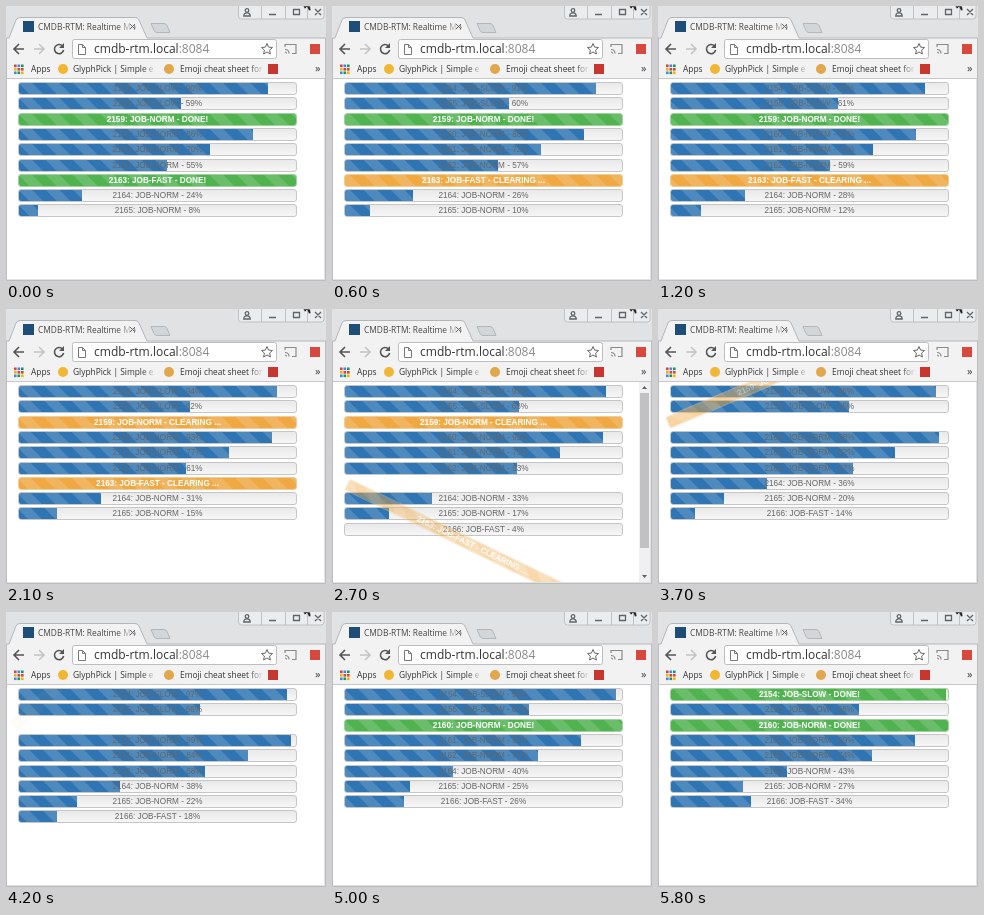
Animation of 320x275 px, one loop 5.9 s. Source, as an HTML page:

```html
<!DOCTYPE html>
<html lang="en">
<head>
<meta charset="utf-8">
<title>Job monitor</title>
<style>
html, body { margin: 0; width: 100%; height: 100%; overflow: hidden; background: #fff; }
#stage { position: relative; width: 320px; height: 275px; overflow: hidden; }
svg { position: absolute; left: 0; top: 0; font: 8.4px "Open Sans", "Noto Sans", sans-serif; }
#page { position: absolute; left: 1px; top: 73px; width: 317px; height: 200px; overflow: hidden; }
.job {
  position: absolute; left: 11px; width: 279px; height: 13px; box-sizing: border-box;
  border: 1px solid #c6c6c6; border-radius: 3px; overflow: hidden;
  background: linear-gradient(#e9e9e9, #f6f6f6); transform-origin: 0 100%;
  font: 8.2px/12px "Liberation Sans", Arial, sans-serif; text-align: center; color: #666;
}
.fill {
  position: absolute; left: 0; top: 0; height: 100%;
  background: linear-gradient(45deg, #ffffff26 25%, #0000 25% 50%, #ffffff26 50% 75%, #0000 75%) 0 0 / 27.3px 27.3px #2f75b3;
}
.label { position: absolute; left: 0; width: 100%; }
.done, .clear { color: #fff; font-weight: bold; }
.done { border-color: #9fd09f; }
.clear { border-color: #efcd9a; }
.done .fill { background-color: #50b350; }
.clear .fill { background-color: #f0a843; }
#scroll { position: absolute; right: 0; top: 0; width: 11px; height: 200px; background: #f0f0f0; }
#thumb { position: absolute; left: 1px; top: 11px; width: 9px; background: #c1c1c1; }
#scroll svg { fill: #606060; }
</style>
</head>
<body>
<div id="stage">
<svg width="320" height="275">
  <defs>
    <linearGradient id="fade"><stop offset="0" stop-color="#f2f2f2" stop-opacity="0"/><stop offset="1" stop-color="#f2f2f2"/></linearGradient>
  </defs>
  <rect width="320" height="275" fill="#e0e2e4"/>
  <!-- window buttons -->
  <path d="M232.500 0V10q0 3 3 3H315q3 0 3-3V0M255.500 0V13M279.500 0V13M301.500 0V13" fill="#ebecee" stroke="#bfc2c5"/>
  <g fill="none" stroke="#606468" stroke-width="1.300">
    <circle cx="241" cy="4.500" r="1.800"/><path d="M237.800 10q0-3.200 3.200-3.200t3.200 3.200z"/>
    <path d="M263 8.500h7M287.500 3.500h6v5h-6zM309 3l6 6m0-6l-6 6"/>
  </g>
  <path d="M297 0h7l1 4-2 1-2-4-2 2z" fill="#222" stroke="#fff" stroke-width=".5"/>
  <!-- tab strip -->
  <path d="M0 32H3L10 14Q11 11.500 14 11.500H129Q132 11.500 133 14L141 32H320V73H0Z" fill="#f2f2f2"/>
  <path d="M0 32H3L10 14Q11 11.500 14 11.500H129Q132 11.500 133 14L141 32H320" fill="none" stroke="#b4b7ba"/>
  <path d="M145 17.500h13q2 0 3 2l3 7h-13q-2 0-3-2z" fill="#d3d6d9" stroke="#b4b7ba"/>
  <rect x="17" y="15" width="11" height="11" fill="#1e4e78"/>
  <text x="32" y="24" fill="#444">CMDB-RTM: Realtime Mo</text>
  <rect x="111" y="14" width="17" height="14" fill="url(#fade)"/>
  <path d="M124 18l5 5m0-5l-5 5" stroke="#666"/>
  <!-- toolbar -->
  <g fill="none" stroke-width="1.600">
    <path d="M18 43H8m5-5l-5 5 5 5" stroke="#555"/>
    <path d="M28 43h10m-5-5l5 5-5 5" stroke="#c4c4c4"/>
    <path d="M56.500 40A4.600 4.600 0 1 0 57.600 44" stroke="#555"/>
  </g>
  <path d="M58 37v5h-5z" fill="#555"/>
  <rect x="66.500" y="33.500" width="204" height="19" rx="2" fill="#fff" stroke="#bdbdbd"/>
  <path d="M72.500 38.500h4l3 3v7h-7zM76.500 38.500v3h3" fill="none" stroke="#777"/>
  <text x="88" y="47" font-size="12" fill="#333">cmdb-rtm.local<tspan fill="#888">:8084</tspan></text>
  <path d="M261 37.500l1.600 3.600 3.900.4-2.900 2.600.8 3.900-3.400-2-3.400 2 .8-3.900-2.900-2.600 3.900-.4z" fill="none" stroke="#666"/>
  <g fill="none" stroke="#8b8b8b" stroke-width="1.200">
    <path d="M279 41v-2.500h11v9h-4M279 43.500q4 0 4 4M279 46q1.500 0 1.500 1.500"/>
  </g>
  <rect x="304" y="38" width="10" height="10" fill="#d9483f"/>
  <!-- bookmarks -->
  <g id="apps"></g>
  <g fill="#333">
    <text x="25" y="66">Apps</text>
    <text x="67" y="66">GlyphPick | Simple e</text>
    <text x="174" y="66">Emoji cheat sheet for</text>
    <text x="309" y="66" font-size="11">»</text>
  </g>
  <rect x="136" y="57" width="14" height="13" fill="url(#fade)"/>
  <rect x="243" y="57" width="15" height="13" fill="url(#fade)"/>
  <circle cx="57" cy="63" r="5" fill="#f3b632"/>
  <circle cx="163" cy="63" r="5" fill="#e2a64c"/>
  <rect x="262" y="58" width="10" height="10" fill="#c8372f"/>
  <path d="M0 72.500H320" stroke="#c8c8c8"/>
  <rect x="1" y="73" width="317" height="200" fill="#fff"/>
  <path d="M.5 32V274.500H319.500V32" fill="none" stroke="#b9bdc1"/>
</svg>
<div id="page">
  <div id="scroll">
    <div id="thumb"></div>
    <svg width="11" height="200"><path d="M3 7h5L5.500 4zM3 193h5l-2.500 3z"/></svg>
  </div>
</div>
</div>
<script>
const LOOP = 5.9, WIDTH = 279, PITCH = 15.3;
const RATE = { SLOW: 1.62, NORM: 3.3, FAST: 9.6 };
const LAG = { SLOW: 0.6, NORM: 1.2, FAST: 4.8 };
const $ = id => document.getElementById(id);

// from: percent at time 0; the other times are in seconds
const jobs = [
  { id: 2154, type: "SLOW", from: 90.4, done: 5.6 },
  { id: 2155, type: "SLOW", from: 59 },
  { id: 2159, type: "NORM", from: 100, done: -1, clear: 1.4, out: 3.4, turn: -45 },
  { id: 2160, type: "NORM", from: 85.6, done: 4.4 },
  { id: 2161, type: "NORM", from: 70 },
  { id: 2162, type: "NORM", from: 54.55 },
  { id: 2163, type: "FAST", from: 100, done: -1, clear: 0.4, out: 2.35, turn: 45 },
  { id: 2164, type: "NORM", from: 23.8 },
  { id: 2165, type: "NORM", from: 8.1 },
  { id: 2166, type: "FAST", from: -21.98, start: 2.3 },
];

for (const job of jobs) {
  job.el = document.createElement("div");
  job.el.innerHTML = '<div class="fill"></div><div class="label"></div>';
  [job.fill, job.label] = job.el.children;
  $("page").insertBefore(job.el, $("scroll"));
}

const colors = ["#db4437", "#f4b400", "#0f9d58", "#4285f4"];
for (let i = 0; i < 9; i++) {
  const x = 8 + i % 3 * 3.5, y = 58.5 + Math.floor(i / 3) * 3.5;
  $("apps").innerHTML += `<rect x="${x}" y="${y}" width="2.6" height="2.6" fill="${colors[(i * 3 + (i > 4)) % 4]}"/>`;
}

function barWidth(job, t) {
  const at = s => job.from - LAG[job.type] + RATE[job.type] * s;
  if (!(t >= job.done)) return Math.max(0, at(t));
  const reached = Math.min(100, at(job.done));
  return job.done < 0 ? 100 : reached + (100 - reached) * Math.min(1, (t - job.done) / 0.5);
}

function draw(t) {
  let row = 0, bottom = 0;
  for (const job of jobs) {
    const shown = t >= (job.start ?? 0) && !(t >= job.out + 1);
    job.el.style.display = shown ? "" : "none";
    if (!shown) continue;

    const top = 3 + PITCH * row++;
    const state = t >= job.clear ? "clear" : t >= job.done ? "done" : "";
    const status = { clear: "CLEARING ...", done: "DONE!" }[state]
      ?? Math.round(job.from + RATE[job.type] * t) + "%";
    job.el.className = "job " + state;
    job.label.textContent = `${job.id}: JOB-${job.type} - ${status}`;
    job.fill.style.width = barWidth(job, t) + "%";
    job.fill.style.backgroundPositionX = 27.3 * (1 - t / 2 % 1) + "px";

    // leaving: swing around the lower left corner and fade
    const p = t >= job.out ? 1 - (1 - (t - job.out)) ** 2 : 0;
    const angle = p * (job.turn ?? 0);
    Object.assign(job.el.style, {
      top: top + "px", opacity: 1 - p, zIndex: p ? 1 : 0,
      transform: angle ? `rotate(${angle}deg)` : "none",
    });
    bottom = Math.max(bottom, top + 13 + WIDTH * Math.sin(angle * Math.PI / 180));
  }
  $("scroll").style.display = bottom > 200 ? "" : "none";
  $("thumb").style.height = 178 * 200 / bottom + "px";
}

function tick() {
  const t = performance.now() / 1000 % LOOP;
  draw(Math.floor(t * 10) / 10);
  requestAnimationFrame(tick);
}
tick();
</script>
</body>
</html>
```
